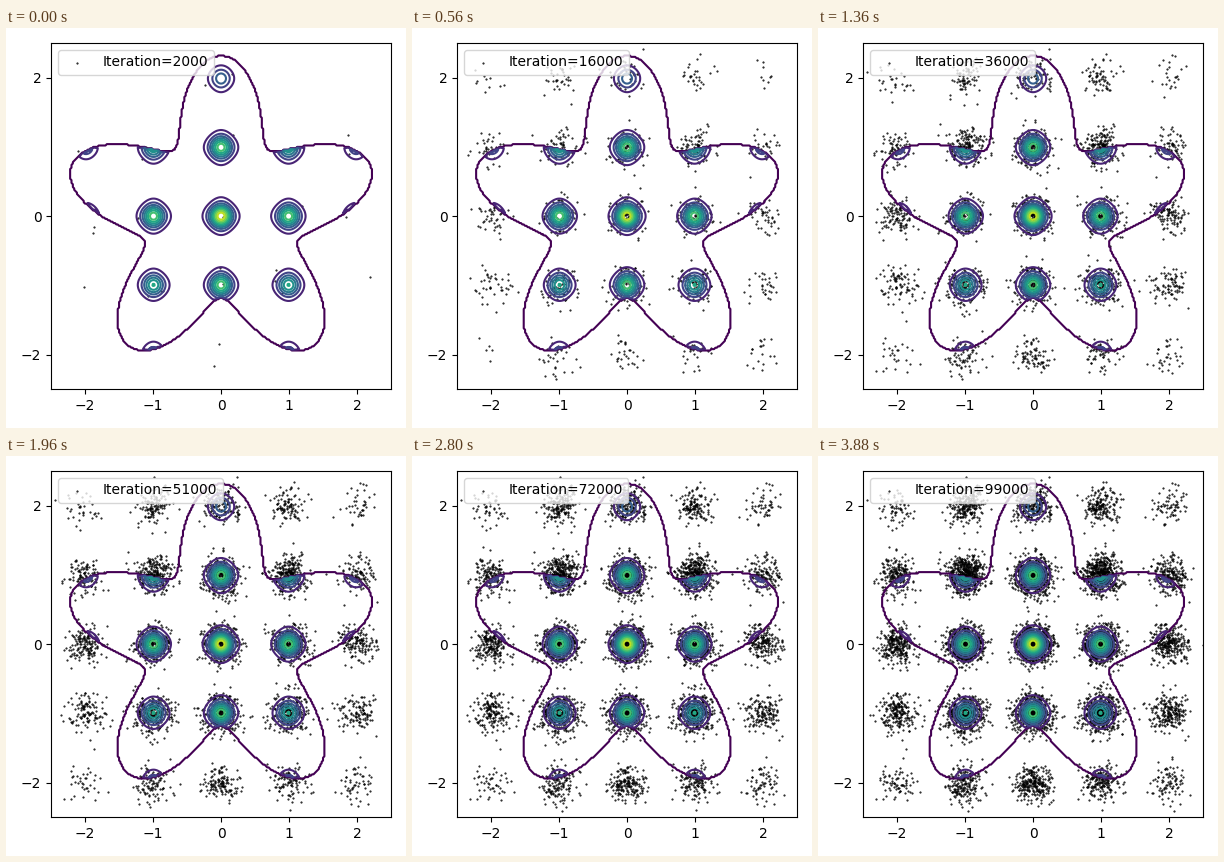
Write a matplotlib script that moves like this. It is 400 by 400 pixels and loops after 3.92 s.

```python
import numpy as np
import matplotlib.pyplot as plt
from matplotlib.animation import FuncAnimation

FRAMES = 98
INTERVAL = 40
LIMIT = 2.5
FIRST, PER_FRAME = 40, 95     # samples at the start, and added per frame
SPREAD = 0.135                # standard deviation within a cluster


def density(x, y):
    """Lattice of peaks, cut off outside a five-armed star."""
    waves = 2 - np.cos(2 * np.pi * x) - np.cos(2 * np.pi * y)
    peaks = np.exp(-0.25 * (x**2 + y**2) - 2 * waves)
    edge = 1.74 + 0.565 * np.sin(5 * np.arctan2(y, x))
    return np.where(np.hypot(x, y) < edge, peaks, 0)


def draw_samples(rng, total):
    """Scatter points around the lattice, more often near the middle."""
    lattice = np.arange(-2, 3)
    weights = np.exp(-0.33 * lattice**2)
    centers = rng.choice(lattice, (total, 2), p=weights / weights.sum())
    return centers + rng.normal(0, SPREAD, (total, 2))


samples = draw_samples(np.random.default_rng(7), FIRST + PER_FRAME * FRAMES)

fig, ax = plt.subplots(figsize=(4, 4), dpi=100)
axis = np.linspace(-LIMIT, LIMIT, 251)
gx, gy = np.meshgrid(axis, axis)
ax.contour(gx, gy, density(gx, gy), levels=np.arange(11) / 10,
           cmap="viridis", vmin=0, vmax=1, zorder=2)
dots = ax.scatter(*samples[:FIRST].T, s=1, marker=".", c="black",
                  zorder=1, label="Iteration=2000")
ax.set(xlim=(-LIMIT, LIMIT), ylim=(-LIMIT, LIMIT),
       xticks=range(-2, 3), yticks=[-2, 0, 2])
caption = ax.legend(loc="upper left").get_texts()[0]
fig.tight_layout()


def update(frame):
    dots.set_offsets(samples[:FIRST + PER_FRAME * frame])
    caption.set_text(f"Iteration={2000 + 1000 * frame}")
    return dots, caption


anim = FuncAnimation(fig, update, frames=FRAMES, interval=INTERVAL,
                     repeat=True, repeat_delay=0, blit=False)
plt.show()
```
